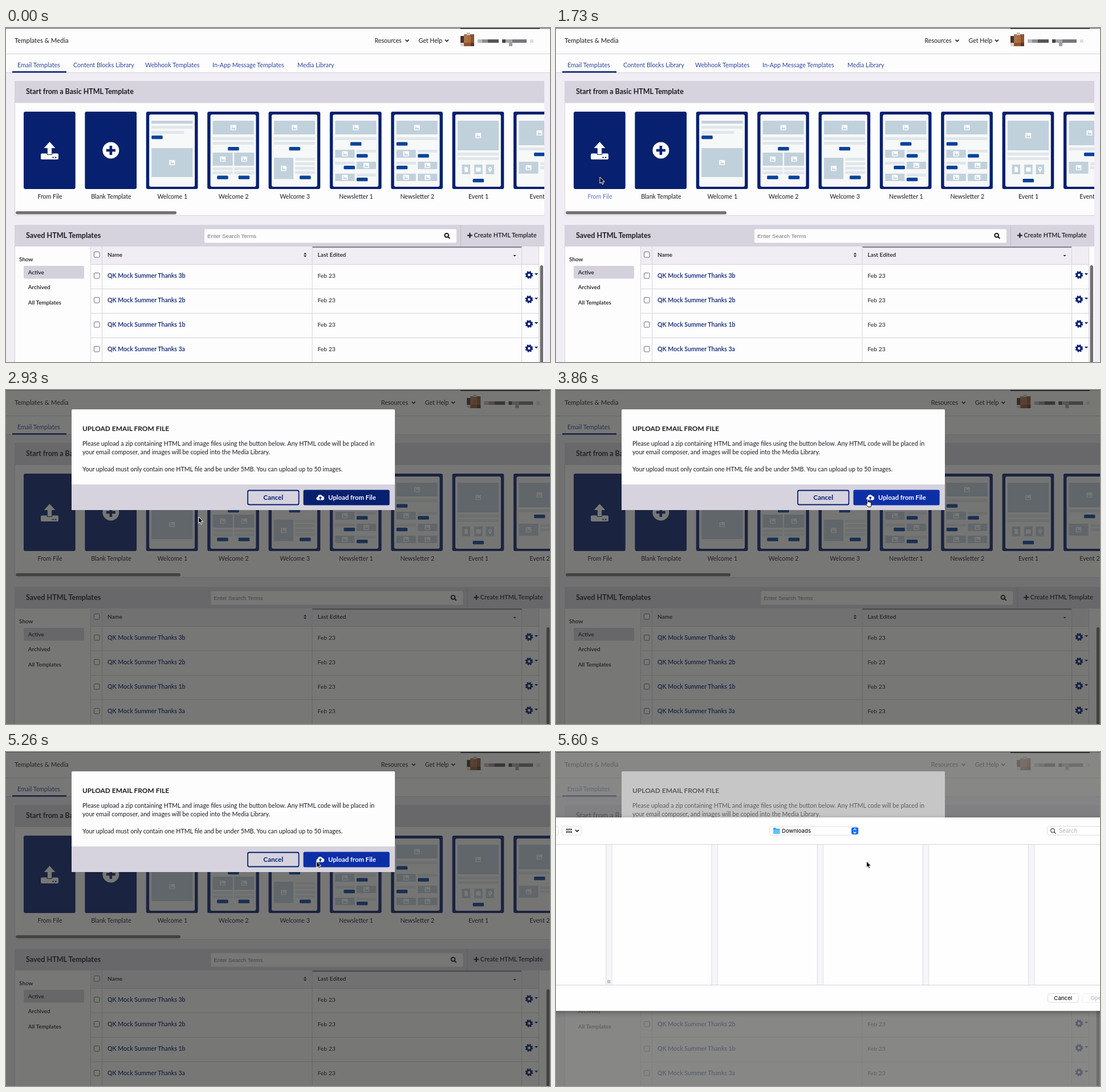
Write an HTML page that moves like this. It is 954 px wide and 587 px high and loops after 6.2 s.

```html
<!DOCTYPE html>
<html lang="en">
<head>
<meta charset="utf-8">
<title>Upload email from file</title>
<style>
html, body { margin: 0; width: 100%; height: 100%; overflow: hidden; background: #f0edf4; }
svg { display: block; width: 954px; height: 587px; }
text { font-family: Lato, "Open Sans", sans-serif; fill: #1b1b20; white-space: pre; }
.mid { text-anchor: middle; }
.semi { font-weight: 600; }
.bold { font-weight: 700; }
.link { fill: #2c479c; }
.navy { fill: #07206f; }
.light { fill: #fff; }
.plain { font-family: "Liberation Sans", Arial, sans-serif; fill: #75757a; }
.mac { font-family: Inter, sans-serif; font-weight: 500; }
.off { fill: #b4b4b6; font-weight: 400; }
</style>
</head>
<body>
<svg id="stage" viewBox="0 0 954 587"></svg>
<script>
const NAVY = '#07206f', BAND = '#d6d3de', BACK = '#f0edf4', LINE = '#d6d3dc', INK = '#1b1b20',
      SLATE = '#c1d1dc', PALE = '#e0e7eb', BLUE = '#07429a', WHITE = '#fdfdfd';
const LOOP = 6200, STEP = 1000 / 15;

const rect = (x, y, w, h, fill, more = '') =>
  `<rect x="${x}" y="${y}" width="${w}" height="${h}" fill="${fill}" ${more}/>`;
const path = (d, fill, more = '') => `<path d="${d}" fill="${fill}" ${more}/>`;
const text = (x, y, size, str, cls = '', more = '') =>
  `<text x="${x}" y="${y}" font-size="${size}" class="${cls}" ${more}>${str}</text>`;
const at = (x, y, body) => `<g transform="translate(${x} ${y})">${body}</g>`;
const each = (list, fn) => list.map(fn).join('');
const stroke = (color, w) => `stroke="${color}" stroke-width="${w}"`;
const vline = (x, y, h) => rect(x, y, 1, h, LINE);
const hline = (x, y, w) => rect(x, y, w, 1, LINE);
const chevron = (x, y) => path(`M${x - 3} ${y - 1.5}l3 3 3-3`, 'none', stroke(INK, 1.7));
const caret = (x, y, w, color, dir = 1) =>
  path(`M${x - w} ${y}h${2 * w}l${-w} ${w * dir}z`, color);
const lens = (x, y, color, w) =>
  `<circle cx="${x}" cy="${y}" r="3.4" fill="none" ${stroke(color, w)}/>` +
  path(`M${x + 2.5} ${y + 2.5}l3.2 3.2`, 'none', stroke(color, w));

// Parts of the template thumbnails, x relative to the card
const L = 9.5, R = 47, FULL = 72, HALF = 34;
const bar = (x, y, w = FULL, fill = PALE) => rect(x, y, w, 5, fill);
const btn = (x, y) => rect(x, y, 19.5, 6.3, BLUE, 'rx="1.5"');
const pic = (x, y, w, h) => rect(x, y, w, h, SLATE) + at(x + w / 2, y + h / 2,
  rect(-5, -4.5, 10, 9, WHITE, 'rx="1"') + path('M-4 3l2.6-4 2 2.4 1.5-1.6 2 3.2z', SLATE) +
  `<circle cx="-2.3" cy="-2" r=".9" fill="${SLATE}"/>`);
const chip = x => rect(x, 240, 14.5, 17, SLATE);
const hero = pic(L, 163, FULL, 24) + bar(L, 192);

const cards = [
  ['Welcome 1', bar(L, 163, FULL, SLATE) + bar(L, 172) + bar(L, 181, 57) + btn(L, 189) +
    pic(L, 211, FULL, 51)],
  ['Welcome 2', hero + bar(L, 200) + btn(36, 209) + each([L, R], x =>
    pic(x, 219, HALF + 1, 23) + bar(x, 245, HALF + 1) + bar(x, 252, HALF + 1) + btn(x + 7.5, 259.5))],
  ['Welcome 3', hero + bar(L, 200) + btn(36, 209) + pic(L, 228, HALF, 37.5) +
    each([228, 236, 244, 251.5], y => bar(R, y, HALF)) + btn(54.5, 259.5)],
  ['Newsletter 1', hero + btn(36, 200.5) + pic(L, 214, HALF, 14) + bar(R, 214, HALF) + btn(R, 221.5) +
    bar(L, 235, HALF) + btn(24.5, 242) + pic(R, 235, HALF, 13) +
    pic(L, 256, HALF, 13) + bar(R, 256, HALF) + btn(R, 263)],
  ['Newsletter 2', hero + btn(L, 200.5) + pic(L, 214, HALF, 14) + bar(R, 214, HALF) + btn(R, 221.5) +
    bar(L, 235, HALF) + btn(L, 242) + pic(R, 235, HALF, 13) +
    pic(L, 256, HALF, 13) + pic(R, 256, HALF, 13)],
  ['Event 1', pic(L, 163, FULL, 52) + bar(L, 219) + bar(L, 227) + each([17, 38.5, 59], chip) +
    path('M21.5 244h4l2 2v7h-6z', WHITE) + rect(41.5, 245, 8.5, 7.5, WHITE, 'rx="1"') +
    path('M66.3 254l-3-5a3.3 3.3 0 1 1 6 0z', WHITE) +
    `<circle cx="66.3" cy="247.3" r="1.2" fill="${SLATE}"/>` + btn(36, 265)],
  ['Event 2', pic(L, 163, FULL, 43) + bar(L, 210) + btn(36, 219) + pic(L, 235, HALF, 21) +
    bar(R, 236, HALF) + bar(R, 243, HALF)]
];
const cardX = i => 31 + 107.37 * i;
const tile = (i, name, body, id = '') =>
  at(cardX(i), 0, rect(0, 147, 90.7, 136, NAVY, 'rx="3"') + body) +
  text(cardX(i) + 46, 299.6, 10.6, name, 'mid', id);

const header =
  rect(0, 0, 954, 79, WHITE) + hline(0, 45, 954) + hline(0, 78, 954) +
  text(15, 26, 11.3, 'Templates &amp; Media') +
  each([[20, 'Email Templates'], [118, 'Content Blocks Library'], [244, 'Webhook Templates'],
    [362, 'In-App Message Templates'], [511, 'Media Library']],
    ([x, s]) => text(x, 68.7, 10.7, s, 'link')) +
  rect(11, 76, 95, 2.5, NAVY);

const account = '<g class="shift">' +
  text(646.5, 26, 10.6, 'Resources') + chevron(703.5, 22) +
  text(723.5, 26, 10.6, 'Get Help') + chevron(773, 22) +
  rect(797, 16, 6, 16, '#ddd3cb') + rect(803, 11, 18, 21, '#8b5331') +
  rect(797, 14, 6, 12, '#4a3129') + rect(803, 11, 6, 15, '#a8764f') + rect(809, 14, 6, 12, '#b06a3a') +
  rect(815, 26, 6, 6, '#53382c') + rect(808, 8, 6, 5, '#c9c2bc') +
  rect(827, 20, 8, 6, '#b9b9bd') + rect(835, 20, 10, 6, '#8e8e92') + rect(845, 20, 19, 6, '#55555a') +
  rect(870, 20, 6, 6, '#44444a') + rect(876, 20, 12, 6, '#a5a5a9') + rect(888, 20, 25, 6, '#77777c') +
  rect(882, 26, 6, 6, '#a0a0a4') + rect(919, 20, 6, 6, '#dedee0') + '</g>';

const gallery =
  rect(15, 93, 960, 237, LINE) + rect(16, 131.5, 960, 197.5, WHITE) + rect(15, 93, 960, 38.5, BAND) +
  text(35, 116, 12.45, 'Start from a Basic HTML Template', 'bold') +
  '<g clip-path="url(#crop)">' +
  tile(0, 'From File',
    rect(30, 220.5, 31, 10.5, WHITE, 'rx="2"') +
    path('M45.5 199.5l10.8 12h-6.6v11h-8.4v-11h-6.6z', WHITE, stroke(NAVY, 1)) +
    rect(50.5, 226.5, 2.2, 2.2, NAVY) + rect(55, 226.5, 2.2, 2.2, NAVY), 'id="fromFile"') +
  tile(1, 'Blank Template',
    `<circle cx="45.5" cy="215" r="14.5" fill="${WHITE}"/>` +
    path('M45.5 207v16M37.5 215h16', 'none', stroke(NAVY, 4.6))) +
  each(cards, ([name, body], i) => tile(i + 2, name,
    rect(5.4, 152, 79.9, 127, '#f7f8f8', 'rx="3"') + body)) +
  '</g>' + rect(17, 322, 282, 5.5, '#737373', 'rx="2.7" id="scroll"');

const gear = y => at(917.3, y,
  `<circle r="5.5" fill="none" ${stroke(NAVY, 2.6)} stroke-dasharray="2.5 1.82"/>` +
  `<circle r="3.8" fill="none" ${stroke(NAVY, 3.2)}/>`) + caret(930, y - 3, 3.2, NAVY);
const check = y => rect(154.5, y - 4.5, 9.5, 9.5, WHITE, 'rx="1.5" ' + stroke('#6f6f74', 1));
const row = (suffix, i) => {
  const y = 435 + 43 * i;
  return check(y) + text(178, y + 3.8, 10.6, 'QK Mock Summer Thanks ' + suffix, 'semi navy') +
    text(546.5, y + 3.8, 10.3, 'Feb 23') + gear(y - 1);
};

const saved =
  rect(15, 346, 960, 241, LINE) + rect(16, 384, 960, 203, WHITE) + rect(15, 346, 960, 38, BAND) +
  text(35, 368.7, 12.6, 'Saved HTML Templates', 'bold') +
  '<g class="shift">' + rect(348, 353.5, 442, 24, WHITE, 'rx="2"') +
  text(353, 369.3, 9.75, 'Enter Search Terms', 'plain') + lens(772.7, 364.3, INK, 2) +
  rect(797, 346, 1, 38, '#c1bec9') + path('M813.5 360v9M809 364.5h9', 'none', stroke(INK, 2.2)) +
  text(820.5, 368.4, 10.75, 'Create HTML Template', 'semi') + '</g>' +
  text(23, 410, 10, 'Show', 'semi') + rect(31, 418, 106, 22.5, '#d4d1dc', 'rx="2"') +
  each([[433, 'Active'], [459.3, 'Archived'], [486, 'All Templates']],
    ([y, s]) => text(38.7, y, 9.95, s, 'semi')) +
  rect(149, 384, 786, 31, BACK) + rect(537, 384, 368, 2.2, '#85848c') +
  each([415, 458, 501, 544], y => hline(149, y, 786)) +
  each([148, 168, 536.5, 904, 934], x => vline(x, 384, 203)) +
  check(398) + text(178, 402, 10, 'Name', 'semi') + text(546.5, 402, 10.2, 'Last Edited', 'semi') +
  caret(524.5, 397.8, 2.7, INK, -1) + caret(524.5, 399.8, 2.7, INK) + caret(892, 399, 2.6, INK) +
  each(['3b', '2b', '1b', '3a'], row);

const margin = '<g class="shift">' + rect(936.5, 417, 5.5, 180, '#707070', 'rx="2.7"') +
  rect(944, 80, 22, 507, BACK) + '</g>';

const cloud =
  path('M546.8 193.4a2.9 2.9 0 0 1-.2-5.7 4.4 4.4 0 0 1 8.3-1.2 3.5 3.5 0 0 1 .6 6.9z', WHITE) +
  path('M551.2 187l2.8 3h-1.8v2.6h-2V190h-1.8z', NAVY);
const modal = '<g id="modal">' + rect(0, 1, 954, 586, '#262625', 'opacity=".62"') +
  rect(115, 34, 567, 177, WHITE, 'rx="2"') + rect(115, 166, 567, 45, BAND) +
  text(134, 71.5, 11.95, 'UPLOAD EMAIL FROM FILE', 'bold') +
  each([
    [98, 'Please upload a zip containing HTML and image files using the button below. Any HTML code will be placed in'],
    [113.2, 'your email composer, and images will be copied into the Media Library.'],
    [143.4, 'Your upload must only contain one HTML file and be under 5MB. You can upload up to 50 images.']
  ], ([y, s]) => text(134, y, 10.66, s)) +
  rect(424, 176.5, 89.5, 25, 'none', 'rx="2.5" ' + stroke(NAVY, 1.8)) +
  text(468.8, 193.1, 11.7, 'Cancel', 'mid bold navy') +
  rect(521.5, 175.5, 151.2, 27, NAVY, 'rx="2.5" id="upload"') + cloud +
  text(565, 193.1, 11.3, 'Upload from File', 'bold light') + '</g>';

// File chooser, drawn with its top edge at 0
const field = (x, y, w, h, edge = '#dcdcdc') => rect(x, y, w, h, '#fff', 'rx="4" ' + stroke(edge, 1));
const dots = each([18, 21.6, 25.2], x =>
  each([19.5, 24], y => rect(x, y, 2.6, 3.2, '#4a4a4a', 'rx=".6"')));
const sheet = rect(0, 1, 954, 586, '#969695', 'id="veil"') + '<g id="sheet">' +
  rect(-20, 0, 994, 340, '#fefefe', 'filter="url(#shade)"') +
  hline(0, 47, 954) + hline(0, 294, 954) +
  each([0, 1, 2, 3, 4], i => at(87.3 + 185.2 * i, 48,
    rect(0, 0, 11, 246, '#f5f5fa') + rect(0, 0, 1, 246, '#dcdcde') + rect(10.3, 0, 1, 246, '#e2e2e4'))) +
  rect(90.8, 285.5, 1, 6, '#777') + rect(93.6, 285.5, 1, 6, '#777') +
  field(-20, 15.5, 24.5, 15.5) + field(10.5, 15.5, 34, 15.5) + dots + chevron(37, 23.3) +
  field(374.5, 16, 156, 15) +
  path('M381 19.5q0-1.2 1.2-1.2h3l1.3 1.4h5q1 0 1 1v7q0 1-1 1h-9.5q-1 0-1-1z', '#2da5e0') +
  rect(381, 21.3, 11.5, 7.4, '#5fc5f5', 'rx="1"') +
  text(396, 27, 9.6, 'Downloads', 'mac') + rect(518, 17.5, 12, 12.3, '#0a6cf5', 'rx="3"') +
  path('M521.7 22.2l2.3-2.3 2.3 2.3M521.7 25.2l2.3 2.3 2.3-2.3', 'none', stroke('#fff', 1.3)) +
  field(861.5, 15.5, 120, 15.5) + lens(871, 23, '#4a4a4a', 1.2) + text(882, 27.2, 9.7, 'Search', 'mac off') +
  field(862.5, 309.5, 54, 15.5) + text(889.3, 321, 9.6, 'Cancel', 'mac mid') +
  field(922.5, 309.5, 56, 15.5, '#ececec') + text(937.5, 321, 9.6, 'Open', 'mac off') + '</g>';

const cursor = '<g id="cursor" stroke-linejoin="round">' +
  path('M0 0V11.2L2.6 8.8 4.3 12.8 6.3 12 4.6 8.1H8.1Z', '#000', 'id="arrow" ' + stroke('#fff', 1)) +
  path('M1 1.2q1-1.2 2 0V5q1-.9 1.9.2 1-.8 1.8.3 1.5-.4 1.6 1V9.5L7.5 13.5H2.6L-.6 9Q-1.5 7.5 0 7.3L1 8.2Z',
    '#fff', 'id="hand" ' + stroke('#000', 1)) + '</g>';

const stage = document.getElementById('stage');
stage.innerHTML = '<defs><clipPath id="crop"><rect class="shift" x="16" y="131" width="928" height="190"/></clipPath>' +
  '<filter id="shade" x="-5%" y="-10%" width="110%" height="120%">' +
  '<feDropShadow dx="0" dy="3" stdDeviation="5" flood-opacity=".3"/></filter></defs>' +
  rect(0, 0, 954, 587, BACK) + header + account + gallery + saved + margin + modal + sheet +
  rect(0, 0, 954, 1, '#55555a') + rect(797, 0, 139, 1.5, '#111') + cursor;

const $ = id => document.getElementById(id);
const shifted = document.querySelectorAll('.shift');
const show = (id, on) => $(id).setAttribute('display', on ? 'inline' : 'none');
const mix = (a, b, k) => a + (b - a) * k;
const clamp = v => Math.min(1, Math.max(0, v));

function pointer(t) {
  // the pointer moves 15 times a second
  const q = Math.floor((t + 8) / STEP) * STEP;
  if (t < 1860) {
    const k = Math.sin(clamp((q - 1000) / 460) * Math.PI / 2);
    return [mix(5, 77, k), mix(278, 262, k)];
  }
  const k = (1 - Math.cos(clamp((q - 2393) / 1007) * Math.PI)) / 2;
  return [mix(77, 544.5, k), mix(262, 192, k)];
}

function buttonColor(t) {
  if (t < 3800) return NAVY;
  const fading = t < 3860 || (t >= 4800 && t < 4860);
  return fading ? '#0a288b' : '#0d2fa6';
}

function draw(t) {
  const open = t >= 1860, picking = t >= 5400, hand = t >= 3860 && t < 5260;
  shifted.forEach(el => el.setAttribute('transform', `translate(${open ? 11.3 : 0} 0)`));
  $('scroll').setAttribute('width', open ? 289 : 282);
  $('fromFile').style.fill = t >= 330 && !open ? '#5f76c4' : '';
  $('upload').setAttribute('fill', buttonColor(t));
  show('modal', open);
  show('veil', picking);
  show('sheet', picking);
  if (picking) {
    const left = 1 - Math.min(3, Math.floor((t - 5393) / STEP)) / 3;
    $('sheet').setAttribute('transform', `translate(0 ${115 - 13 * left * left})`);
    $('sheet').setAttribute('opacity', 1 - .02 * left);
    $('veil').setAttribute('opacity', .53 - .27 * left);
  }
  show('cursor', t >= 1000);
  show('arrow', !hand);
  show('hand', hand);
  $('cursor').setAttribute('transform', `translate(${pointer(t).join(' ')})`);
}

const start = performance.now();
function tick() {
  draw((performance.now() - start) % LOOP);
  requestAnimationFrame(tick);
}
tick();
</script>
</body>
</html>
```
